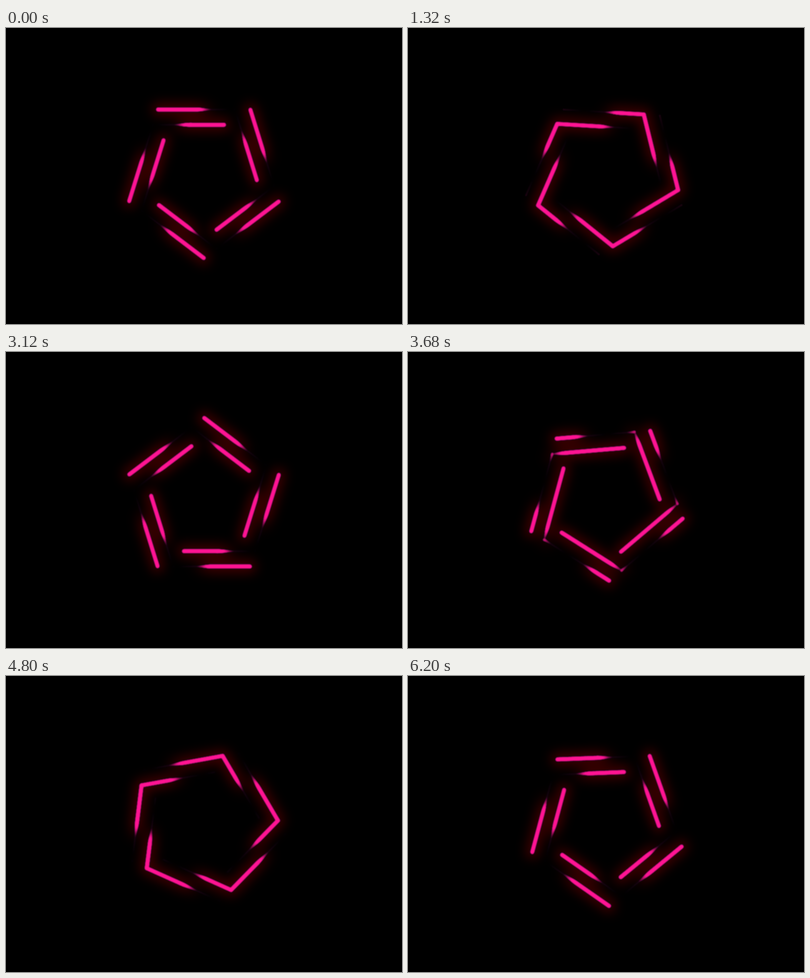
An HTML page with a canvas that plays this animation: 800x600 px, repeating every 6.24 s.

```html
<!DOCTYPE html>
<html lang="en">
<head>
<meta charset="utf-8">
<title>Neon pentagon</title>
<style>
html, body { margin: 0; width: 100%; height: 100%; overflow: hidden; background: #000; }
canvas { position: absolute; left: 0; top: 0; mix-blend-mode: lighten; }
#glow { filter: blur(11px); }
#core { filter: blur(.8px); }
</style>
</head>
<body>
<canvas id="glow" width="800" height="600"></canvas>
<canvas id="core" width="800" height="600"></canvas>
<script>
const LOOP = 6240;
const PERIOD = 264;   // length of one light-dark wave along a bar pair
const DARK = 85;      // dark part of the wave
const SIDES = 5;
const SQUEEZE = .955; // the pentagon is fitted to a square, so it is a little narrow
// Each side carries an outer and an inner bar; offset maps x to wave position.
const BARS = [
  { y: -134.7, from: -97.4, to: 65.4, offset: 101 },
  { y: -103.8, from: -107.9, to: 42.4, offset: 261 }
];

const [glow, core] = ['glow', 'core'].map(id => document.getElementById(id).getContext('2d'));
const clamp = v => Math.max(0, Math.min(1, v));
const smooth = v => { v = clamp(v); return v * v * (3 - 2 * v); };

// Signed distance from the nearest edge of the lit stretch, positive inside.
function depth(pos, shift) {
  const q = (((pos - shift) % PERIOD) + PERIOD) % PERIOD;
  return q < DARK ? -Math.min(q, DARK - q) : Math.min(q - DARK, PERIOD - q);
}

function dot(ctx, x, y, r, rgb) {
  ctx.fillStyle = `rgb(${rgb})`;
  ctx.beginPath();
  ctx.arc(x, y, r, 0, 7);
  ctx.fill();
}

function drawBar({ y, from, to, offset }, shift) {
  const steps = Math.round(to - from);
  for (let i = 0; i <= steps; i++) {
    const x = from + (to - from) * i / steps;
    const d = depth(x + offset, shift);
    const light = Math.max(smooth((d + 8) / 32), .11 * clamp((d + 38) / 38));
    const radius = 1.6 + 2.7 * smooth((d + 2) / 34);
    dot(core, x, y, radius, [255 * light, 20 * light, 147 * light]);
    const halo = clamp(d / 35);
    if (halo > 0 && i % 2 === 0) dot(glow, x, y, 14, [56 * halo, 0, 0]);
  }
}

function draw(now) {
  const t = now % LOOP / LOOP;
  const shift = 115 - 2 * PERIOD * t;
  for (const ctx of [glow, core]) {
    ctx.setTransform(1, 0, 0, 1, 0, 0);
    ctx.globalCompositeOperation = 'source-over';
    ctx.fillStyle = '#000';
    ctx.fillRect(0, 0, 800, 600);
    ctx.globalCompositeOperation = 'lighten';
    ctx.translate(400, 300);
    ctx.rotate(2 * Math.PI * t);
    ctx.scale(SQUEEZE, 1);
  }
  for (let side = 0; side < SIDES; side++) {
    for (const bar of BARS) drawBar(bar, shift);
    for (const ctx of [glow, core]) ctx.rotate(2 * Math.PI / SIDES);
  }
}

function frame() {
  draw(performance.now());
  requestAnimationFrame(frame);
}
frame();
</script>
</body>
</html>
```
